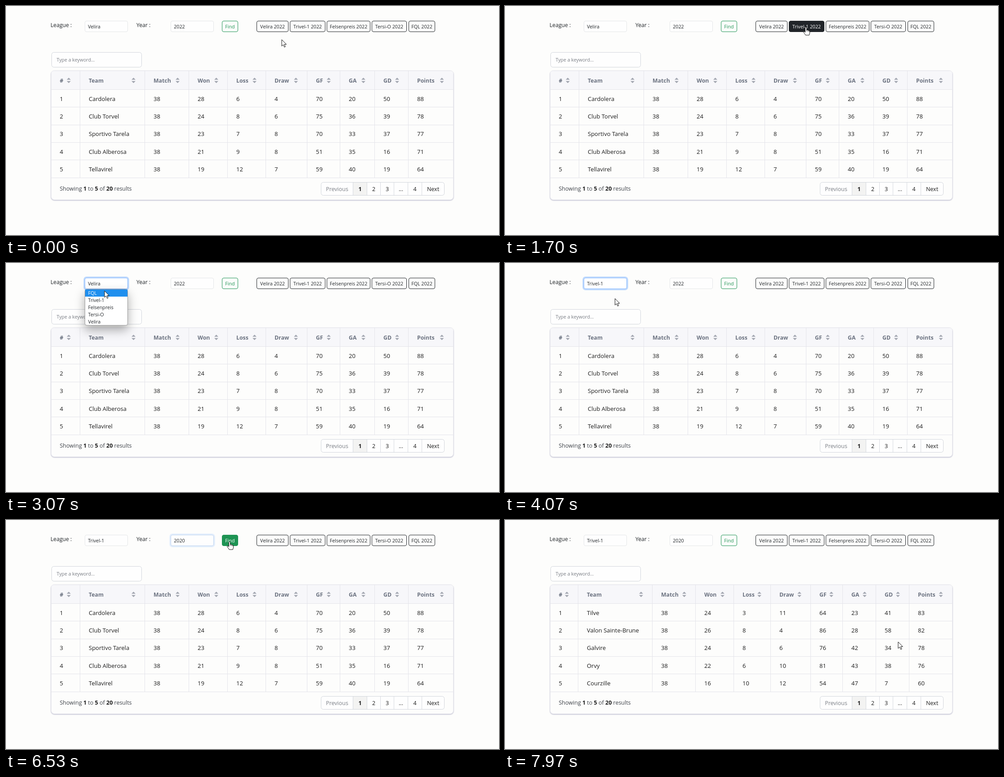
Animation of 1096x511 px, one loop 8 s. Source, as an HTML page:

```html
<!DOCTYPE html>
<html lang="en">
<head>
<meta charset="utf-8">
<title>League standings</title>
<style>
html, body { margin: 0; width: 100%; height: 100%; overflow: hidden; background: #fdfdfc; }
svg { display: block; width: 1096px; height: 511px; font-family: "Open Sans", "Noto Sans", sans-serif; font-size: 13px; fill: #1c1c1c; }
.small { font-size: 10.7px; fill: #212529; }
.label { font-size: 12.2px; fill: #212529; }
.head { font-size: 12.3px; font-weight: 700; fill: #6b7280; }
.foot { font-size: 12.5px; fill: #3f434a; }
.hint { font-size: 10.6px; fill: #7b7f86; }
.bold { font-weight: 700; fill: #1c1c1c; }
.mid { text-anchor: middle; }
.line { stroke: #e4e4ea; fill: none; }
.box { fill: #fefefe; stroke: #d2d6dc; }
.card { fill: #fdfdfc; stroke: #e3e3ea; filter: drop-shadow(0 1px 1px rgba(50, 50, 110, .35)); }
.menu { fill: #fff; stroke: #999; filter: drop-shadow(0 10px 11px rgba(0, 0, 0, .32)); }
</style>
</head>
<body>
<svg id="stage" viewBox="0 0 1096 511"></svg>
<script>
const LOOP = 8000, FADE = 150;
const OPEN = 2700, PICK = 3800, STEP1 = 5015, STEP2 = 5500, BLUR = 6440, LOAD = 7050;
const leagues = ['FQL', 'Trivel-1', 'Felsenpreis', 'Tersi-O', 'Velira'];
const heads = ['#', 'Team', 'Match', 'Won', 'Loss', 'Draw', 'GF', 'GA', 'GD', 'Points'];

const tables = [
  {
    edges: [100, 164.5, 308.5, 406.5, 492.5, 577.5, 669.5, 742.5, 819.5, 894.5, 994],
    rows: [
      'Cardolera|38|28|6|4|70|20|50|88',
      'Club Torvel|38|24|8|6|75|36|39|78',
      'Sportivo Tarela|38|23|7|8|70|33|37|77',
      'Club Alberosa|38|21|9|8|51|35|16|71',
      'Tellavirel|38|19|12|7|59|40|19|64']
  },
  {
    edges: [100, 162.5, 327.5, 423.5, 508.5, 590.5, 679.5, 750.5, 824.5, 898.5, 994],
    rows: [
      'Tilve|38|24|3|11|64|23|41|83',
      'Valon Sainte-Brune|38|26|8|4|86|28|58|82',
      'Galvire|38|24|8|6|76|42|34|78',
      'Orvy|38|22|6|10|81|43|38|76',
      'Courzille|38|16|10|12|54|47|7|60']
  }
];

const dark = [33, 37, 41], green = [30, 148, 84];
const buttons = [
  ['Find', 480.5, 515.5, green],
  ['Velira 2022', 557.5, 627.5, dark],
  ['Trivel-1 2022', 631.5, 709.5, dark],
  ['Felsenpreis 2022', 713.5, 809.5, dark],
  ['Tersi-O 2022', 813.5, 890.5, dark],
  ['FQL 2022', 895.5, 953.5, dark]
];

// Pointer stops: time, x, y
const path = [
  [0, 613, 75], [100, 613, 75], [420, 597, 49], [1000, 597, 49], [1500, 669, 47], [1900, 669, 47],
  [2550, 224, 48], [2780, 221, 48], [2980, 219, 62], [3350, 219, 63], [3650, 214, 83], [3900, 214, 84],
  [4650, 445, 49], [5700, 445, 49], [6250, 497, 48], [7150, 497, 48], [7700, 874, 272], [8000, 874, 272]
];

const text = (x, y, s, cls = '', extra = '') => `<text x="${x}" y="${y}" class="${cls}" ${extra}>${s}</text>`;
const rect = (x, y, w, h, r, attrs) => `<rect x="${x}" y="${y}" width="${w}" height="${h}" rx="${r}" ${attrs}/>`;
const line = (d, attrs = 'class="line"') => `<path d="${d}" ${attrs}/>`;
const group = (id, body) => `<g id="${id}">${body}</g>`;

function sorter(x) {
  return `<path fill="#a0a4ae" d="M${x - 4.5} 164.5l4.5-4.5 4.5 4.5zM${x - 4.5} 167.5l4.5 4.5 4.5-4.5z"/>`;
}

function table({ edges, rows }, id) {
  let out = '';
  heads.forEach((h, i) => {
    const x = i ? edges[i] + 19.5 : 119.5;
    out += text(x, 170.6, h, 'head') + sorter(edges[i + 1] - 25);
    if (i) out += line(`M${edges[i]} 145V383`);
    rows.forEach((row, r) => {
      out += text(x, 211.6 + r * 39.4, [r + 1, ...row.split('|')][i]);
    });
  });
  return group(id, out);
}

function pager() {
  const cuts = [700.5, 771.5, 802.5, 832.5, 862.5, 893.5, 924.5, 974.5];
  let out = rect(700.5, 393.5, 274, 29, 5, 'class="box"') + rect(772, 394, 30, 28, 0, 'fill="#f3f3f2"');
  ['Previous', '1', '2', '3', '...', '4', 'Next'].forEach((s, i) => {
    const style = i ? (i === 1 ? 'bold' : '') : 'hint';
    out += text((cuts[i] + cuts[i + 1]) / 2, 413, s, style + ' mid', 'style="font-size:12.5px"');
    if (i) out += line(`M${cuts[i]} 394V422`, 'stroke="#d6d9de"');
  });
  return out;
}

function field(id, x) {
  return rect(x, 33.5, 95, 24, 3.5, 'fill="#fefefe" stroke="#e4e6e8"') +
    group(id + 'Ring', rect(x - 1.5, 32, 98, 27, 5, 'fill="none" stroke="#c0dafd" stroke-width="3.5"') +
      rect(x, 33.5, 95, 24, 3.5, 'fill="#fff" stroke="#86b7fe"')) +
    text(x + 6.7, 49.7, '', 'small', `id="${id}"`);
}

function button([label, x1, x2, color], i) {
  const c = `rgb(${color})`;
  return rect(x1, 33.5, x2 - x1, 24, 3.5, `id="btn${i}" fill="${c}" stroke="${c}"`) +
    text((x1 + x2) / 2, 49.7, label, 'small mid', `id="cap${i}"`);
}

function menu() {
  return group('menu', rect(175.5, 58.5, 95, 80.5, 4, 'class="menu"') +
    rect(176, 59, 94, 16, 0, 'id="mark" fill="#1f8fee"') +
    leagues.map((s, i) => text(182.5, 71 + i * 16, s, 'small', `id="item${i}"`)).join(''));
}

const spinner = group('spin', rect(442, 38, 12, 7.5, 0, 'fill="#e8e8e8"') +
  rect(442, 45.5, 12, 7.5, 0, 'id="down" fill="#e8e8e8"') +
  '<path fill="#444" d="M445 43.5l3-3 3 3z"/><path id="tick" fill="#444" d="M445 47.8l3 3 3-3z"/>');

const arrow = '<path d="M0 0V14.5L3.4 11.4L5.8 16.8L8.1 15.8L5.8 10.6H10.3Z" fill="#fff" stroke="#111"/>';
const hand = '<path d="M-1.6 1.4Q0-1 1.5 1.4V6.5Q3.6 5.6 4.3 7.2Q6.2 6.6 6.8 8.3Q9 8.2 8.6 10.8V13Q8 15.5 7.2 18H-.8Q-2.6 14.6-5.2 11.8Q-5.8 9.8-3.8 9.8L-1.6 11.6Z" fill="#fff" stroke="#111"/>' +
  '<path d="M1.5 6.5V9.5M4.3 7.5V10M6.8 8.5V10.5" stroke="#111" stroke-width=".9"/>';

const stage = document.getElementById('stage');
stage.innerHTML =
  text(99, 47, 'League :', 'label') + text(290, 47, 'Year :', 'label') +
  field('league', 175.5) + field('year', 366.5) + spinner +
  line('M398.5 39V53', 'id="caret" stroke="#222"') +
  buttons.map(button).join('') +
  rect(101.5, 103.5, 200, 33, 5, 'class="box"') + text(112.5, 123.8, 'Type a keyword...', 'hint') +
  rect(100.5, 144.5, 894, 288, 7, 'class="card"') +
  '<path d="M101 187V151Q101 145 107 145H988Q994 145 994 151V187Z" fill="#f7f7fa"/>' +
  [0, 1, 2, 3, 4, 5].map(i => line(`M101 ${Math.round(187 + i * 39.3) - .5}H994`)).join('') +
  tables.map((t, i) => table(t, 'table' + i)).join('') +
  text(119.5, 412.3, 'Showing <tspan class="bold">1</tspan> to <tspan class="bold">5</tspan> of <tspan class="bold">20</tspan> results', 'foot') +
  pager() + menu() +
  group('pointer', group('arrow', arrow) + group('hand', hand));

const el = {};
stage.querySelectorAll('[id]').forEach(n => el[n.id] = n);
const show = (id, on) => el[id].setAttribute('visibility', on ? 'visible' : 'hidden');
const clamp = v => Math.max(0, Math.min(1, v));
const ramp = (t, on, off) => clamp((t - on) / FADE) - clamp((t - off) / FADE);
const during = (t, a, b) => t >= a && t < b;

function pointerAt(t) {
  const i = Math.max(1, path.findIndex(p => p[0] >= t));
  const [t0, x0, y0] = path[i - 1], [t1, x1, y1] = path[i];
  const u = clamp((t - t0) / (t1 - t0)), e = u * u * (3 - 2 * u);
  return [x0 + (x1 - x0) * e, y0 + (y1 - y0) * e];
}

const inside = ([x, y], x1, x2) => x > x1 && x < x2 && y > 33 && y < 58;

// Hover strength: share of the last fade period spent over the button
function hover(t, x1, x2) {
  let n = 0;
  for (let k = 0; k < 10; k++) n += inside(pointerAt(Math.max(0, t - k * FADE / 10)), x1, x2);
  return n / 10;
}

function draw(t) {
  const pos = pointerAt(t);
  let overButton = false;
  buttons.forEach(([, x1, x2, color], i) => {
    const h = hover(t, x1, x2);
    el['btn' + i].setAttribute('fill-opacity', h);
    el['cap' + i].style.fill = `rgb(${color.map(c => Math.round(c + (255 - c) * h))})`;
    overButton = overButton || inside(pos, x1, x2);
  });
  el.pointer.setAttribute('transform', `translate(${pos[0].toFixed(2)} ${pos[1].toFixed(2)})`);
  show('hand', overButton);
  show('arrow', !overButton);

  el.league.textContent = leagues[t < PICK ? 4 : 1];
  el.year.textContent = t < STEP1 ? 2022 : t < STEP2 ? 2021 : 2020;
  el.leagueRing.setAttribute('opacity', ramp(t, OPEN, STEP1 + 15));
  el.yearRing.setAttribute('opacity', ramp(t, STEP1 + 15, BLUR));
  show('caret', during(t, STEP1, BLUR) && (t - STEP1) % 1060 < 530);

  const pressed = during(t, STEP1, STEP1 + 110) || during(t, STEP2, STEP2 + 110);
  show('spin', inside(pos, 366, 462));
  el.down.setAttribute('fill', pressed ? '#777' : '#dcdcdc');
  el.tick.setAttribute('fill', pressed ? '#222' : '#444');

  const row = pos[1] < 59 ? 4 : Math.min(4, Math.floor((pos[1] - 59) / 16));
  el.menu.style.display = during(t, OPEN, PICK) ? '' : 'none';
  el.mark.setAttribute('y', 59 + row * 16);
  leagues.forEach((_, i) => el['item' + i].style.fill = i === row ? '#fff' : '#212529');

  show('table0', t < LOAD);
  show('table1', t >= LOAD);
}

const start = performance.now();
function tick() {
  draw((performance.now() - start) % LOOP);
  requestAnimationFrame(tick);
}
tick();
</script>
</body>
</html>
```
